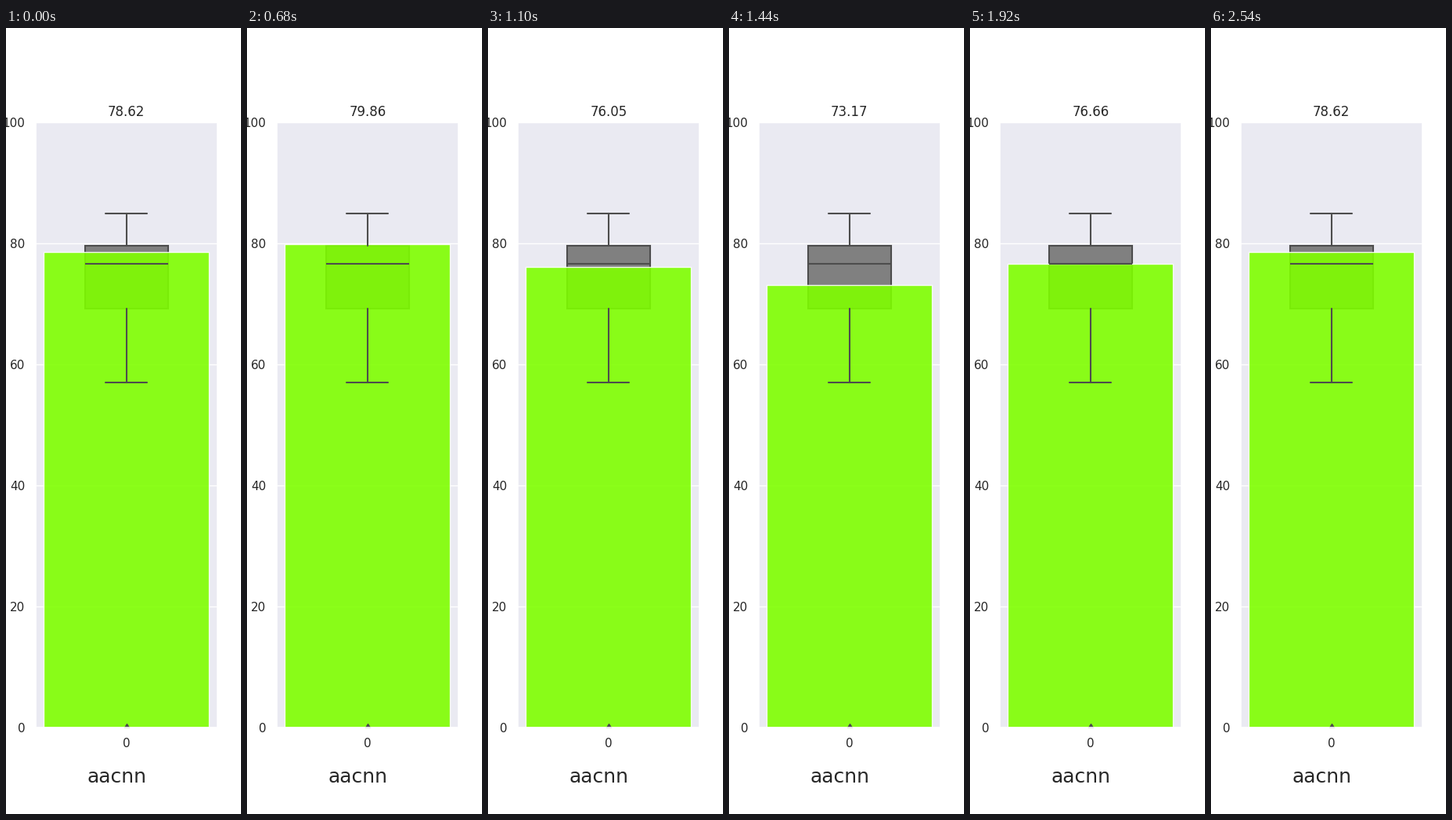
Recreate the animation shown at these times as a matplotlib script. Size 300 by 1000 pixels, loop 2.56 s.

```python
import matplotlib.pyplot as plt
import numpy as np
from matplotlib.animation import FuncAnimation

TICK_MS = 20
INK, LINE, PANEL = "#262626", "#4d4d4d", "#eaeaf2"
GOOD_SCORE = 70

# Ticks each score stays on screen: a long hold, then quick steps.
CYCLE = [5, 1, 1, 1]
HOLDS = [1, 1] + CYCLE * 9 + [5, 2] + CYCLE * 5 + [5, 1, 1]
STEP_AT_TICK = np.repeat(np.arange(len(HOLDS)), HOLDS)

# (step, score) poses; the score eases from one to the next.
POSES = [(0, 78.62), (3, 76.6), (7, 57.74), (10, 70.4), (13, 77.2),
         (18, 79.86), (22, 83.5), (27, 76.05), (33, 79.5), (37, 72.0),
         (40, 57.31), (44, 70.5), (48, 77.8), (53, 69.24), (57, 79.7),
         (62, 78.62)]

plt.rcParams.update({
    "font.family": "DejaVu Sans",
    "text.color": INK,
    "lines.solid_capstyle": "round",
})


def score_at(step):
    for (s0, v0), (s1, v1) in zip(POSES, POSES[1:]):
        if step <= s1:
            u = (step - s0) / (s1 - s0)
            return v0 + (v1 - v0) * u * u * (3 - 2 * u)
    return POSES[-1][1]


def style_axes(ax):
    ax.set_facecolor(PANEL)
    ax.set_axisbelow(True)
    ax.grid(axis="y", color="white", linewidth=1)
    ax.set(xlim=(-0.44, 0.44), ylim=(0, 100))
    ax.set_xticks([0], ["0"])
    ax.set_yticks(range(0, 101, 20))
    ax.tick_params(length=6, pad=3.5, labelsize=11, labelcolor=INK,
                   bottom=False, left=False)
    for spine in ax.spines.values():
        spine.set(color="white", linewidth=1.25)


def draw_box(ax):
    stats = dict(med=76.62, q1=69.24, q3=79.62, whislo=57.03, whishi=84.95,
                 fliers=[0])
    stroke = dict(color=LINE, linewidth=1.5)
    parts = ax.bxp(
        [stats], positions=[0], widths=0.4, capwidths=0.2,
        patch_artist=True, manage_ticks=False,
        boxprops=dict(facecolor="#808080", edgecolor=LINE, linewidth=1.5),
        whiskerprops=stroke, capprops=stroke, medianprops=stroke,
        flierprops=dict(marker="d", markersize=5, markerfacecolor=LINE,
                        markeredgecolor=LINE))
    # The box sits behind the bar, its lines in front.
    parts["boxes"][0].set_zorder(0.9)


fig, ax = plt.subplots(figsize=(3, 10), dpi=100, facecolor="white")
style_axes(ax)
draw_box(ax)
bar = ax.bar(0, 0, width=0.8, alpha=0.9, edgecolor="white", linewidth=1)[0]
title = ax.set_title("", fontsize=12)
fig.text(141.7 / 300, 0.04, "aacnn", fontsize=18, ha="center", va="baseline")


def update(tick):
    score = score_at(STEP_AT_TICK[tick])
    bar.set_height(score)
    bar.set_facecolor("chartreuse" if score >= GOOD_SCORE else "yellow")
    title.set_text(f"{score:.2f}")
    return bar, title


anim = FuncAnimation(fig, update, frames=len(STEP_AT_TICK), interval=TICK_MS,
                     repeat=True, repeat_delay=0)
plt.show()
```
